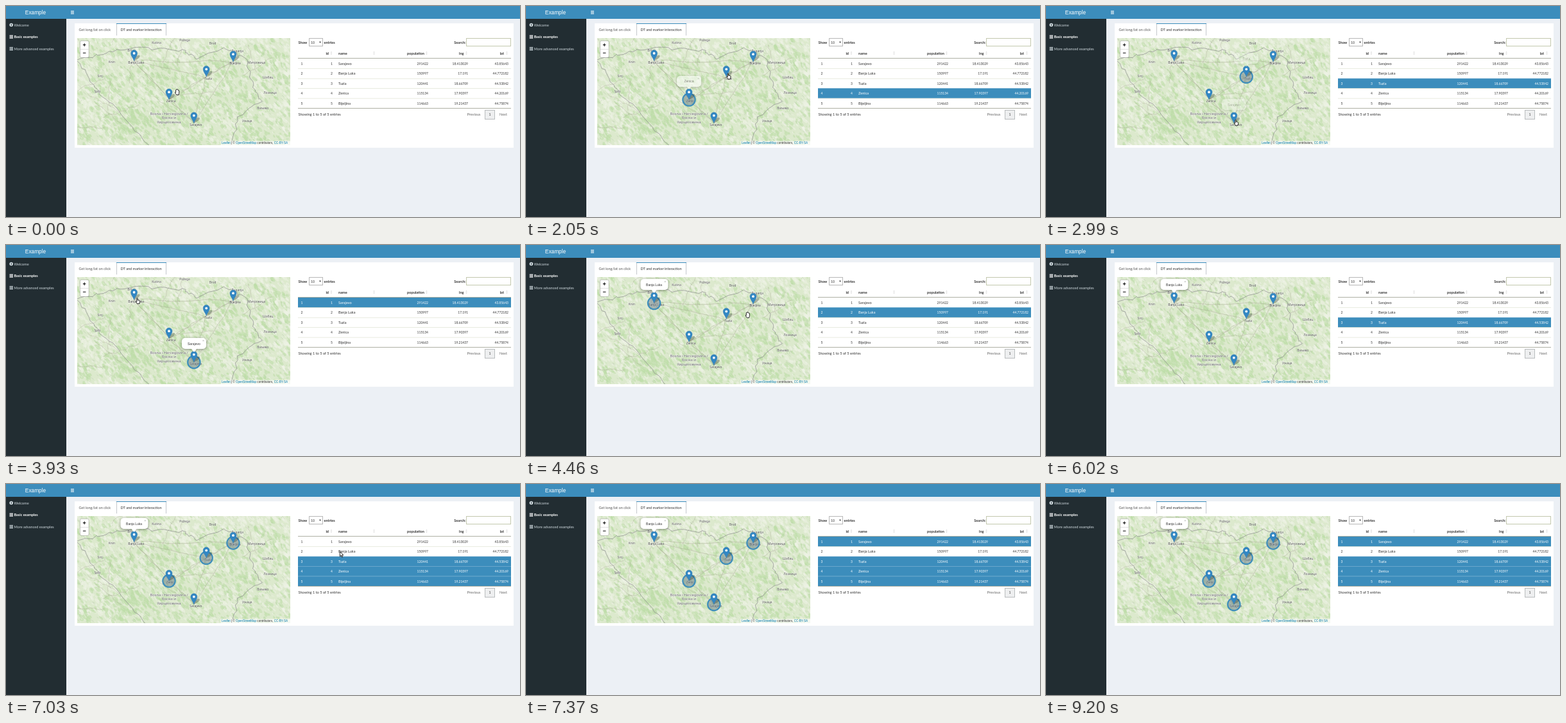
An HTML page with a canvas for the animation above (9.26 s loop, 801 px wide and 329 px high).

```html
<!DOCTYPE html>
<html lang="en">
<head>
<meta charset="utf-8">
<title>Example</title>
<style>
html, body { margin: 0; width: 801px; height: 329px; overflow: hidden; background: #ecf0f5; }
#stage { position: relative; width: 801px; height: 329px; overflow: hidden; }
canvas { position: absolute; left: 0; top: 0; }
span { position: absolute; white-space: pre; color: #333; font: 5.6px/10px Lato, "Open Sans", sans-serif; }
.arial { font-family: "Liberation Sans", Arial, sans-serif; }
.on span { color: #fff; }
.popup { position: absolute; box-sizing: border-box; height: 17px; min-width: 38px; padding: 3.5px 9px; text-align: center;
  transform: translateX(-50%); border-radius: 5px; background: #fff; box-shadow: 0 1px 4px rgba(0,0,0,.4); }
.popup::after { content: ""; position: absolute; left: 50%; top: 16.5px; margin-left: -4px; border: 4px solid transparent; border-top: 5px solid #fff; border-bottom: 0; }
.popup span { position: static; display: block; font-size: 5px; }
.popup .close { position: absolute; right: 2.5px; top: -1px; font-size: 6px; color: #aaa; }
</style>
</head>
<body>
<div id="stage"><canvas id="base" width="801" height="329"></canvas><div id="ui"></div><canvas id="over" width="801" height="329"></canvas></div>
<script>
const LOOP = 9260, BLUE = '#3c8dbc';
const MAP = { x: 111, y: 50, w: 332, h: 167 };
const TABLE = { x: 455, y: 82, w: 332, row: 15.45 };
const PAN = 5; // the map slides down to make room for the top popup
const ui = document.getElementById('ui');
const g = document.getElementById('base').getContext('2d');
const over = document.getElementById('over').getContext('2d');

const places = [
  ['Sarajevo', '291422', '18.413029', '43.85643'],
  ['Banja Luka', '150997', '17.191', '44.772182'],
  ['Tuzla', '120441', '18.66709', '44.53842'],
  ['Zenica', '115134', '17.90397', '44.20169'],
  ['Bijeljina', '114663', '19.21437', '44.75874']
].map(([name, pop, lng, lat]) => ({
  name, pop, lng, lat, x: 254 + (lng - 17.904) * 76.3, y: 146 - (lat - 44.202) * 106
}));

// A marker click opens its popup and selects only that row; a row click toggles the row.
const clicks = [
  { t: 620, i: 3, map: true }, { t: 1920, i: 2, map: true }, { t: 2780, i: 0, map: true }, { t: 3960, i: 1, map: true },
  { t: 5340, i: 1 }, { t: 5960, i: 2 }, { t: 6370, i: 3 }, { t: 6650, i: 4 }, { t: 7300, i: 0 }
];
const mapClicks = clicks.filter(c => c.map);

const overMarker = i => [places[i].x, places[i].y - 6];
const overRow = i => [520, rowTop(i) + 6];
const start0 = [263, 129];
const moves = [
  { t: 70, d: 380, to: overMarker(3) }, { t: 1250, d: 400, to: overMarker(2) },
  { t: 2380, d: 340, to: overMarker(0) }, { t: 3260, d: 740, to: overMarker(1) },
  { t: 4290, d: 370, to: overRow(3) }, { t: 4700, d: 500, to: overRow(1) },
  { t: 5620, d: 120, to: overRow(2) }, { t: 6100, d: 120, to: overRow(3) },
  { t: 6430, d: 130, to: overRow(4) }, { t: 6710, d: 490, to: overRow(0) }
];

function rowTop(i) { return TABLE.y + i * TABLE.row; }
const ramp = (t, a, b) => Math.max(0, Math.min(1, (t - a) / (b - a)));
const ease = k => k * k * (3 - 2 * k);

function chosen(t) {
  const set = new Set();
  for (const c of clicks) {
    if (c.t + (c.map ? 250 : 0) > t) break;
    if (c.map) set.clear();
    if (!set.delete(c.i)) set.add(c.i);
  }
  return set;
}

function cursorAt(t) {
  let [x, y] = start0;
  for (const m of moves) {
    const k = ease(ramp(t, m.t, m.t + m.d));
    x += (m.to[0] - x) * k;
    y += (m.to[1] - y) * k;
  }
  return [x, y];
}

function rowUnder([x, y]) {
  return x < TABLE.x ? -1 : Math.floor((y - TABLE.y) / TABLE.row);
}

function text(str, x, y, o = {}) {
  const el = document.createElement('span'), s = el.style;
  el.textContent = str;
  s.top = y - 5 + 'px';
  if (o.align === 'r') s.right = 801 - x + 'px';
  else if (o.align === 'c') { s.left = x - 50 + 'px'; s.width = '100px'; s.textAlign = 'center'; }
  else s.left = x + 'px';
  if (o.size) s.fontSize = o.size + 'px';
  if (o.color) s.color = o.color;
  if (o.bold) s.fontWeight = 700;
  if (o.arial) el.className = 'arial';
  (o.to || ui).append(el);
  return el;
}

function box(c, color, x, y, w, h) { c.fillStyle = color; c.fillRect(x, y, w, h); }
function frame(c, color, x, y, w, h) { c.strokeStyle = color; c.lineWidth = 1; c.strokeRect(x + .5, y + .5, w - 1, h - 1); }
function tri(c, x, y, h) { c.beginPath(); c.moveTo(x - 1.3, y); c.lineTo(x + 1.3, y); c.lineTo(x, y + h); c.fill(); }

function buildText() {
  text('Example', 46, 9.8, { size: 8.3, color: '#fff', align: 'c', arial: true });
  ['Welcome', 'Basic examples', 'More advanced examples'].forEach((s, i) =>
    text(s, 12.5, 29.5 + i * 18.6, { color: i === 1 ? '#fff' : '#cfd9de', bold: i === 1, size: i === 1 ? 5.5 : 5.6 }));
  text('Get long/lat on click', 113.5, 37, { color: '#555' });
  text('DT and marker interaction', 178.5, 37);
  ['+', '−'].forEach((s, i) => text(s, 122.2, 61 + i * 12.2, { size: 9, bold: true, align: 'c', arial: true, color: '#000' }));

  const credit = text('', 336, 214, { size: 4.55, arial: true });
  credit.innerHTML = '<i>Leaflet</i> | © <i>OpenStreetMap</i> contributors, <i>CC-BY-SA</i>';
  credit.querySelectorAll('i').forEach(i => i.style.cssText = 'font-style:normal;color:#0078a8');

  text('Show', 455.5, 56.5, { bold: true });
  text('10', 475, 56.5, { size: 5.2 });
  text('entries', 495.5, 56.5, { bold: true });
  text('Search:', 716.5, 56.5, { bold: true, align: 'r' });
  for (const [s, x] of [['id', 503], ['population', 652], ['lng', 713.5], ['lat', 776]])
    text(s, x, 73.5, { bold: true, align: 'r' });
  text('name', 518, 73.5, { bold: true });
  text('Showing 1 to 5 of 5 entries', 455.5, 169);
  text('Previous', 739.5, 169, { align: 'r', color: '#666' });
  text('1', 754, 169, { align: 'c', size: 5.2 });
  text('Next', 769, 169, { color: '#666' });

  places.forEach((p, i) => {
    const to = p.row = document.createElement('div');
    const y = rowTop(i) + 8, size = 5;
    ui.append(to);
    text(i + 1, 459.5, y, { to, size });
    text(p.name, 518, y, { to });
    for (const [s, x] of [[i + 1, 509], [p.pop, 658], [p.lng, 720], [p.lat, 783]])
      text(s, x, y, { to, size, align: 'r' });

    p.popup = document.createElement('div');
    p.popup.className = 'popup';
    p.popup.style.left = p.x + 'px';
    p.popup.innerHTML = `<span class="arial">${p.name}</span><span class="arial close">×</span>`;
    ui.append(p.popup);
  });
}

function buildMap() {
  const cv = document.createElement('canvas');
  cv.width = MAP.w; cv.height = MAP.h + 20;
  const c = cv.getContext('2d');
  let seed = 29;
  const rnd = () => (seed = (seed * 16807) % 2147483647) / 2147483647;
  const spot = () => [MAP.x + rnd() * MAP.w, 40 + rnd() * cv.height];
  box(c, '#dce9cd', 0, 0, cv.width, cv.height);
  c.translate(-MAP.x, 10 - MAP.y);

  // forest is denser in the middle and thins out towards the northern plain
  const woods = (x, y) => .36 + .26 * Math.sin(x / 23 + y / 31) * Math.cos(y / 17 - x / 41)
    + .34 * Math.sin(Math.PI * (x - MAP.x) / MAP.w) * ramp(y, 65, 120) - .2 * ramp(y, 90, 50);
  for (let i = 0; i < 3000; i++) {
    const [x, y] = spot(), r = .8 + rnd() * 3;
    c.fillStyle = rnd() < woods(x, y) ? 'rgba(188,220,166,.55)' : 'rgba(239,243,231,.5)';
    c.beginPath(); c.ellipse(x, y, r * 1.4, r * .7, .65 + rnd() * .5, 0, 7); c.fill();
  }
  c.lineWidth = .6;
  for (let i = 0; i < 1200; i++) {
    const [x, y] = spot(), l = 1 + rnd() * 3;
    c.strokeStyle = rnd() < .5 ? 'rgba(115,140,115,.28)' : 'rgba(252,252,248,.45)';
    c.beginPath(); c.moveTo(x, y); c.lineTo(x + l, y + l * .8); c.stroke();
  }

  function line(color, width, pts, rough) {
    c.strokeStyle = color; c.lineWidth = width;
    c.beginPath(); c.moveTo(...pts[0]);
    for (let i = 1; i < pts.length; i++) {
      const [x0, y0] = pts[i - 1], [x1, y1] = pts[i];
      for (let k = .125; k <= 1; k += .125)
        c.lineTo(x0 + (x1 - x0) * k + (rnd() - .5) * rough, y0 + (y1 - y0) * k + (rnd() - .5) * rough);
    }
    c.stroke();
  }
  const road = 'rgba(165,160,145,.6)';
  places.forEach((p, i) => places.slice(i + 1).forEach(q => line(road, .7, [[p.x, p.y], [q.x, q.y]], 4)));
  for (let i = 0; i < 14; i++) {
    const a = spot(), turn = rnd() * 7;
    line(road, .6, [a, [a[0] + 60 * Math.cos(turn), a[1] + 45 * Math.sin(turn)]], 4);
  }
  const border = 'rgba(125,122,130,.65)';
  line(border, .9, [[111, 84], [155, 73], [200, 64], [277, 70], [297, 81], [344, 65], [374, 83], [384, 123], [398, 149], [362, 174], [350, 222]], 5);
  line(border, .9, [[111, 86], [139, 126], [174, 163], [231, 225]], 5);

  c.textAlign = 'center'; c.textBaseline = 'middle';
  function label(s, x, y, size, color) {
    c.font = `${size}px "Noto Sans", sans-serif`;
    c.strokeStyle = 'rgba(255,255,255,.5)'; c.lineWidth = 1;
    c.strokeText(s, x, y);
    c.fillStyle = color; c.fillText(s, x, y);
  }
  ['Bosna i Hercegovina /', 'Босна и', 'Херцеговина'].forEach((s, i) => label(s, 254, 168 + i * 6.7, 5.8, '#6b6672'));
  places.forEach(p => label(p.name, p.x + 3, p.y + 3, 4.8, '#444'));
  // smaller towns ring the country along the edges of the map
  const towns = ['Ужице', 'Ваљево', 'Лозница', 'Шабац', 'Митровица', 'Županja', 'Brod', 'Požega', 'Kutina', 'Bihać', 'Knin', 'Sinj', 'Split'];
  towns.forEach((s, i) => {
    const a = .75 - i * .33;
    label(s, 277 + 135 * Math.cos(a), 129 + 75 * Math.sin(a), 4.8, '#555');
  });
  return cv;
}

function drawPage() {
  box(g, '#ecf0f5', 0, 0, 801, 329);
  box(g, BLUE, 0, 0, 801, 20);
  box(g, '#222d32', 0, 20, 94, 309);
  for (let i = 0; i < 3; i++) {
    box(g, '#fff', 101, 7.5 + i * 2, 5, 1);
    box(g, '#fff', 5.5, 45.5 + i * 2, 5.5, 1.2);
    box(g, '#cfd9de', 5.5, 64 + i * 2, 5.5, 1.2);
  }
  g.fillStyle = '#cfd9de';
  g.beginPath(); g.arc(8.2, 29.5, 2.8, 0, 7); g.fill();
  box(g, '#222d32', 7.8, 28, .9, 3);

  box(g, '#fff', 107, 27, 684, 194);
  box(g, BLUE, 172, 27, 78, 1);
  for (const x of [172, 249]) box(g, '#c4c8cc', x, 28, 1, 18);

  frame(g, '#b8b8b8', 472, 50, 22, 13);
  frame(g, '#c3c8ae', 717, 50, 70, 13);
  g.fillStyle = '#333'; tri(g, 489.5, 55.5, 2.5);
  g.fillStyle = '#d8d8d8';
  for (const x of [507, 573.5, 655.5, 717.5, 780.5]) { tri(g, x, 72.8, -2); tri(g, x, 74, 2); }
  box(g, '#eeeff0', 746, 162, 16, 15);
  frame(g, '#b9bcbe', 746, 162, 16, 15);
}

function drawRows(t) {
  const on = chosen(t), hover = rowUnder(cursorAt(t - 70));
  box(g, '#fff', TABLE.x, TABLE.y, TABLE.w, 5 * TABLE.row);
  places.forEach((p, i) => {
    const y = rowTop(i), lit = on.has(i);
    if (lit || hover === i) box(g, lit ? BLUE : '#eceef2', TABLE.x, y, TABLE.w, TABLE.row);
    if (i) box(g, lit ? '#6aa8cd' : '#d9ddca', TABLE.x, y, TABLE.w, .6);
    p.row.className = lit ? 'on' : '';
  });
  for (const y of [81, 159]) box(g, '#aeb0a4', TABLE.x, y, TABLE.w, 1);
}

function drawMarker(x, y) {
  g.save();
  g.translate(x, y);
  g.fillStyle = 'rgba(50,60,50,.35)';
  g.beginPath(); g.moveTo(0, 0); g.quadraticCurveTo(3, -9, 8, -9); g.quadraticCurveTo(12, -6, 0, 0); g.fill();
  g.fillStyle = '#3287c3'; g.strokeStyle = '#2d75a8'; g.lineWidth = .5;
  g.beginPath(); g.moveTo(0, 0);
  g.bezierCurveTo(-1, -4, -5, -7.5, -5, -11.8);
  g.arc(0, -11.8, 5, Math.PI, 0);
  g.bezierCurveTo(5, -7.5, 1, -4, 0, 0);
  g.fill(); g.stroke();
  g.fillStyle = '#fff';
  g.beginPath(); g.arc(0, -11.8, 1.9, 0, 7); g.fill();
  g.restore();
}

function drawMap(t) {
  const panAt = mapClicks[3].t + 100;
  const dy = PAN * (1 - (1 - ramp(t, panAt, panAt + 250)) ** 3);
  const rings = chosen(t - 70);
  g.save();
  g.beginPath(); g.rect(MAP.x, MAP.y, MAP.w, MAP.h); g.clip();
  g.drawImage(mapImage, MAP.x, MAP.y - 10 + dy);
  g.fillStyle = 'rgba(105,125,140,.5)'; g.strokeStyle = BLUE; g.lineWidth = 2.1;
  for (const i of rings) {
    g.beginPath(); g.arc(places[i].x, places[i].y + dy, 9.7, 0, 7);
    g.fill(); g.stroke();
  }
  [...places].sort((a, b) => a.y - b.y).forEach(p => drawMarker(p.x, p.y + dy));
  box(g, 'rgba(255,255,255,.72)', 334.5, 210.5, 109, 7);
  g.beginPath(); g.roundRect(115.5, 54.3, 13.6, 26, 2);
  g.fillStyle = '#fff'; g.fill();
  g.strokeStyle = 'rgba(0,0,0,.22)'; g.lineWidth = .9; g.stroke();
  box(g, '#ccc', 116, 67, 12.6, .6);
  g.restore();

  places.forEach(p => p.popup.style.opacity = 0);
  mapClicks.forEach((c, n) => {
    const p = places[c.i], next = mapClicks[n + 1];
    const gone = next ? ramp(t, next.t, next.t + 300) : 0;
    p.popup.style.top = p.y - 37.3 + dy + 'px';
    p.popup.style.opacity = ramp(t, c.t + 150, c.t + 350) * (1 - gone);
  });
}

const arrow = new Path2D('M.4 .2V8L2.2 6.4 3.4 9.2 4.6 8.7 3.4 6H5.8Z');
const pointer = new Path2D('M2 5.8V1.2Q2.7 .1 3.4 1.2V4L6 4.4Q6.9 4.7 6.8 5.7L6.2 9.6H2.6L.4 6.5Q.5 5.2 2 6.4Z');
const openHand = new Path2D('M1.6 6V2Q2.2 1 2.8 1.8V1Q3.5 .1 4.1 1V1.5Q4.9 .9 5.4 1.8V2.5Q6.3 2 6.7 3V6.6L6 9.6H2.7L.4 6.2Q.6 5 1.6 6Z');

function drawCursor(t) {
  over.clearRect(0, 0, 801, 329);
  const [x, y] = cursorAt(t);
  if (chosen(t).has(rowUnder([x, y]))) return; // lost against a selected row
  const onMarker = places.some(p => Math.hypot(p.x - x, p.y - 8 - y) < 9);
  const shape = x > MAP.x + MAP.w ? arrow : onMarker ? pointer : openHand;
  over.save();
  over.translate(x, y);
  over.fillStyle = '#fff'; over.strokeStyle = '#111'; over.lineWidth = .9; over.lineJoin = 'round';
  over.fill(shape); over.stroke(shape);
  over.restore();
}

buildText();
const mapImage = buildMap();
const start = performance.now();

function tick() {
  const t = (performance.now() - start) % LOOP;
  drawPage();
  drawRows(t);
  drawMap(t);
  drawCursor(t);
  requestAnimationFrame(tick);
}
tick();
</script>
</body>
</html>
```
